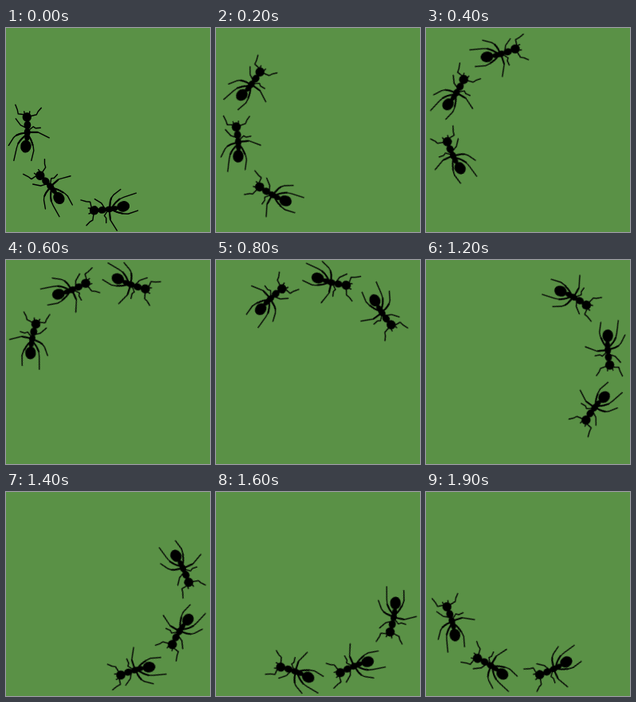
Write an HTML page without scripts that moves like this. It is 256 px wide and 256 px high and loops after 2 s.

```html
<!DOCTYPE html>
<html lang="en">
<head>
<meta charset="utf-8">
<title>Ants in a circle</title>
<style>
  html, body { margin: 0; width: 100%; height: 100%; overflow: hidden; background: #5a9146; }
  svg { display: block; width: 100%; height: 100%; }
  .ring { transform-origin: 128px 128px; animation: march 2s steps(20) infinite; }
  .limbs { fill: none; stroke: #000; stroke-linecap: round; stroke-linejoin: round; }
  @keyframes march { to { transform: rotate(360deg); } }
</style>
</head>
<body>
<svg viewBox="0 0 256 256">
  <defs>
    <!-- One ant, head up, centred on its waist -->
    <g id="ant">
      <ellipse cy="-19" rx="5.7" ry="5.8"/>
      <ellipse cx=".6" cy="-9" rx="4.4" ry="5.2"/>
      <ellipse cx=".4" rx="4" ry="5.5"/>
      <ellipse cy="7" rx="3" ry="4"/>
      <ellipse cx="-1.4" cy="17.8" rx="6.7" ry="8" transform="rotate(8 -1.4 17.8)"/>
      <g class="limbs">
        <!-- antennae and jaws -->
        <path stroke-width="1.4" d="M-3-22L-11-23L-12-28L-14.5-34.5M4-20L12-22L14-26L18-30.5M-3-23L-3.5-26M3-23L3.5-26"/>
        <!-- legs -->
        <path stroke-width="1.4" d="M-2-6L-8-9L-14-17M3-3L8-7L11-5L17-5.5
          M-3 1Q-13 2-17 7L-23 16.5M4 0L14 0L19 2.5L28 7
          M-2 4Q-11 11-13 20L-16.5 35.5M2 4Q8 13 8.5 23L5.5 35.5"/>
        <!-- thighs -->
        <path stroke-width="2.1" d="M-3 1Q-9 1.5-13 3.7M4 0L13 0M-2 4Q-8 8.7-11 14M2 4Q6 10 7.3 16"/>
      </g>
    </g>
  </defs>
  <g class="ring">
    <use href="#ant" transform="translate(26.3 130.8)"/>
    <use href="#ant" transform="translate(55.5 199.3) rotate(-42)"/>
    <use href="#ant" transform="translate(129.6 227) rotate(-95.5) scale(-1 1)"/>
  </g>
</svg>
</body>
</html>
```
